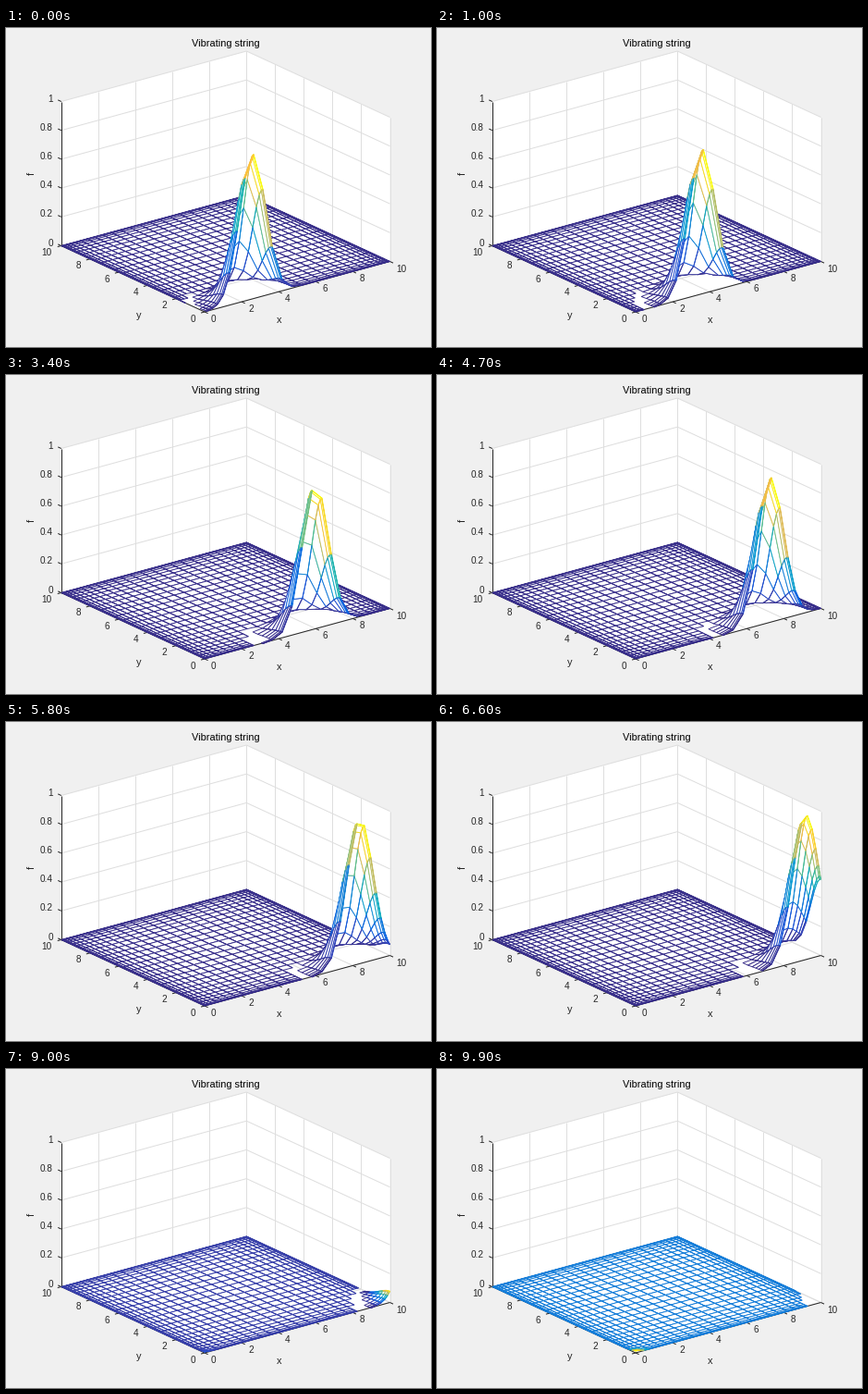
A matplotlib script that plays this animation: 460x345 px, repeating every 10 s.

```python
import numpy as np
import matplotlib.pyplot as plt
from matplotlib.animation import FuncAnimation
from matplotlib.collections import LineCollection, PolyCollection
from matplotlib.colors import LinearSegmentedColormap

W, H, DPI = 460, 345, 80
PX = 72 / DPI
FRAMES, INTERVAL = 100, 100
N = 29  # Chebyshev intervals per side

plt.rcParams["font.family"] = "Liberation Sans"

cmap = LinearSegmentedColormap.from_list("blue_yellow", [
    (0.00, (.208, .166, .529)), (0.095, (.196, .265, .728)),
    (0.14, (.125, .324, .830)), (0.175, (.012, .388, .882)),
    (0.27, (.050, .459, .864)), (0.335, (.078, .504, .838)),
    (0.40, (.030, .600, .820)), (0.46, (.030, .660, .760)),
    (0.50, (.100, .700, .690)), (0.55, (.250, .730, .600)),
    (0.62, (.470, .750, .490)), (0.70, (.680, .744, .405)),
    (0.78, (.882, .727, .322)), (0.84, (.994, .746, .240)),
    (0.92, (.970, .848, .148)), (0.952, (.959, .895, .113)),
    (1.00, (.976, .983, .054))])


def project(x, y, z):
    """Orthographic view of the 10 x 10 x 1 box, in stage pixels."""
    px = 215 + 20.05 * x - 15.52 * y
    py = 307 - 5.45 * x - 7.15 * y - 156 * z
    return np.stack(np.broadcast_arrays(px, py), axis=-1)


nodes = 5 * (1 - np.cos(np.pi * np.arange(N + 1) / N))
X, Y = np.meshgrid(nodes, nodes, indexing="ij")


def height(t):
    c = 2.6 + t
    f = np.exp(-(X - c) ** 2 - Y ** 2)
    # faint dispersive dip trailing the pulse
    d = np.hypot(0.8 * (X - c), Y)
    f -= np.where(X < c, 0.006 * np.exp(-14 * (d - 2.2) ** 2), 0)
    # faint inflow at the origin near the end
    s = np.clip((t - 8.3) / 1.6, 0, 1)
    f += 0.0127 * s * s * (3 - 2 * s) * np.exp(-8 * (X ** 2 + Y ** 2))
    return f


def surface(t):
    """Cells from back to front: a filled quad, then its far-x edge."""
    f = height(t)
    p = project(X, Y, f)
    colors = cmap((f - f.min()) / (f.max() - f.min()))
    a, b, c, d = p[:-1, :-1], p[1:, :-1], p[1:, 1:], p[:-1, 1:]
    quads = np.stack([a, b, c, d], axis=2)
    edges = np.stack([b, c, c, b], axis=2)
    verts = np.stack([quads, edges], axis=2)[::-1, ::-1]
    cols = np.stack([colors[:-1, 1:], colors[1:, 1:]], axis=2)[::-1, ::-1]
    mean = (f[:-1, :-1] + f[1:, :-1] + f[1:, 1:] + f[:-1, 1:]) / 4
    keep = (mean > -0.0012)[::-1, ::-1]
    return verts[keep].reshape(-1, 4, 2), cols[keep].reshape(-1, 4)


fig = plt.figure(figsize=(W / DPI, H / DPI), dpi=DPI, facecolor="#f0f0f0")
ax = fig.add_axes([0, 0, 1, 1])
ax.set(xlim=(0, W), ylim=(H, 0))
ax.axis("off")


def segment(p, q):
    return [project(*p), project(*q)]


def add_lines(segs, color, zorder):
    ax.add_collection(LineCollection(segs, colors=color, linewidths=PX,
                                     zorder=zorder))


def label(x, y, s, size=10, color="#262626", **kw):
    kw = {"ha": "center", "va": "center", **kw}
    ax.text(x, y, s, fontsize=size * PX, color=color, **kw)


# walls and floor
walls = [
    [(0, 10, 0), (10, 10, 0), (10, 10, 1), (0, 10, 1)],
    [(10, 0, 0), (10, 10, 0), (10, 10, 1), (10, 0, 1)],
    [(0, 0, 0), (10, 0, 0), (10, 10, 0), (0, 10, 0)],
]
ax.add_collection(PolyCollection(
    [[project(*p) for p in wall] for wall in walls],
    facecolors="white", edgecolors="none", zorder=0))

grid = []
for v in range(0, 11, 2):
    grid += [segment((v, 10, 0), (v, 10, 1)), segment((10, v, 0), (10, v, 1)),
             segment((0, 10, v / 10), (10, 10, v / 10)),
             segment((10, 0, v / 10), (10, 10, v / 10)),
             segment((v, 0, 0), (v, 10, 0)), segment((0, v, 0), (10, v, 0))]
add_lines(grid, "#dedede", 1)

# axes, ticks and tick labels
axes = [segment((0, 0, 0), (10, 0, 0)), segment((0, 0, 0), (0, 10, 0)),
        segment((0, 10, 0), (0, 10, 1))]
for v in range(0, 11, 2):
    z = v / 10
    axes += [segment((v, 0, 0), (v, -0.23, 0)),
             segment((0, v, 0), (-0.2, v, 0)),
             segment((0, 10, z), (0, 10.23, z))]
    x, y = project(v, 0, 0)
    label(x + 7, y + 8, str(v), ha="left")
    x, y = project(0, v, 0)
    label(x - 10, y + 7.5, str(v), ha="right")
    x, y = project(0, 10, z)
    label(x - 9, y - 3, f"{z:g}", ha="right")
add_lines(axes, "#262626", 2)

label(237.5, 16.5, "Vibrating string", 11, "black")
label(295.5, 316, "x", 11)
label(144, 311.5, "y", 11)
label(28, 157.5, "f", 11, rotation=90)

mesh = PolyCollection([], facecolors="white", linewidths=0.9 * PX,
                      joinstyle="round", zorder=3)
ax.add_collection(mesh, autolim=False)


def update(i):
    verts, cols = surface(i * INTERVAL / 1000)
    mesh.set_verts(verts)
    mesh.set_edgecolor(cols)
    return mesh,


anim = FuncAnimation(fig, update, frames=FRAMES, interval=INTERVAL,
                     repeat=True, repeat_delay=0, blit=False)
plt.show()
```
